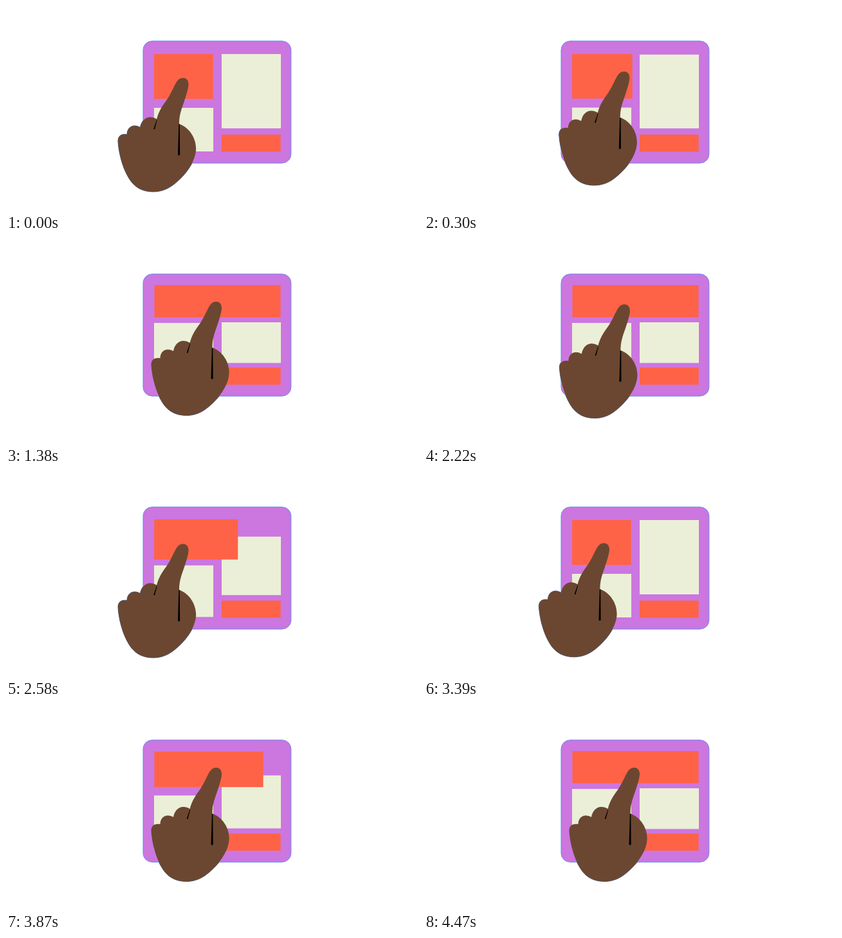
An HTML page for the animation above (4.5 s loop, 640 by 320 pixels).

```html
<!DOCTYPE html>
<html lang="en">
<head>
<meta charset="utf-8">
<title>Resizing a layout tile</title>
<style>
  html, body { margin: 0; height: 100%; overflow: hidden; background: #fff; }
  svg { display: block; width: 640px; height: 320px; }
</style>
</head>
<body>
<svg viewBox="0 0 640 320">
  <!-- blue rim of the hand, seen only outside the board -->
  <use href="#hand" stroke="#3f6cae" stroke-width="1"/>
  <rect x="213" y="54.7" width="229.8" height="190.5" rx="14" fill="#cc76e0" stroke="#6488ee"/>
  <g fill="#ebefd7">
    <rect id="right"/>
    <rect id="left"/>
  </g>
  <g fill="#ff6347">
    <rect x="335" y="200.7" width="91.6" height="26.8"/>
    <rect id="wide"/>
  </g>
  <g id="hand">
    <path fill="#6b4731" d="M275 112.2C281 112.2 284 117 283.5 124C282 136 275 153 271.5 165
      C269.5 172 269 178 269 184C285 190 295.2 206 295.2 223C294.7 241 282 260 266 274
      C254 285 242 290 229 290C213 290 200 284 191 269C181 253 175 229 174 211
      C174 203 179 199 188 200.5C188 190 197 183 208.5 189.5
      C211 175.5 222 169.5 234.2 176.5C236 168 241 158 248 149C256 138 259 129 264 120
      C267 115 270 112.2 275 112.2Z"/>
    <path d="M268.4 184L269.8 185L270.2 232.5Q268.5 234 267 232.5ZM234.2 177.5L234.8 178L231 192.5L229.2 192Z"/>
  </g>
</svg>
<script>
const LOOP = 4500;
const STARTS = [0, 2046, 3300]; // there, back, there again
const HAND_SHIFT = [51.5, -14.5];

// Each tile is [left, top, right, bottom], narrow layout first.
const tiles = [
  { id: 'wide', duration: 470, from: [230, 75, 321.7, 145], to: [230.5, 72, 426.5, 122.3] },
  { id: 'right', duration: 530, from: [335, 75, 427, 191], to: [335, 130, 427, 193.5] },
  { id: 'left', duration: 530, from: [230, 159, 322, 227], to: [230, 131, 322, 225.5] },
];

const byId = id => document.getElementById(id);
const clamp = x => Math.min(1, Math.max(0, x));
const ease = x => (1 - Math.cos(Math.PI * clamp(x))) / 2;

function progress(time, delay, duration) {
  return STARTS.reduce((sum, start, i) =>
    sum + (i % 2 ? -1 : 1) * ease((time - start - delay) / duration), 0);
}

function setTile({ id, duration, from, to }, time) {
  const p = progress(time, 260, duration);
  const [x, y, right, bottom] = from.map((v, i) => v + (to[i] - v) * p);
  const box = { x, y, width: right - x, height: bottom - y };
  for (const name in box) byId(id).setAttribute(name, box[name]);
}

function draw(now) {
  const time = now % LOOP;
  tiles.forEach(tile => setTile(tile, time));
  const p = progress(time, 0, 480);
  byId('hand').setAttribute('transform', `translate(${HAND_SHIFT.map(v => v * p)})`);
}

const begin = performance.now();
function tick() {
  draw(performance.now() - begin);
  requestAnimationFrame(tick);
}
tick();
</script>
</body>
</html>
```
